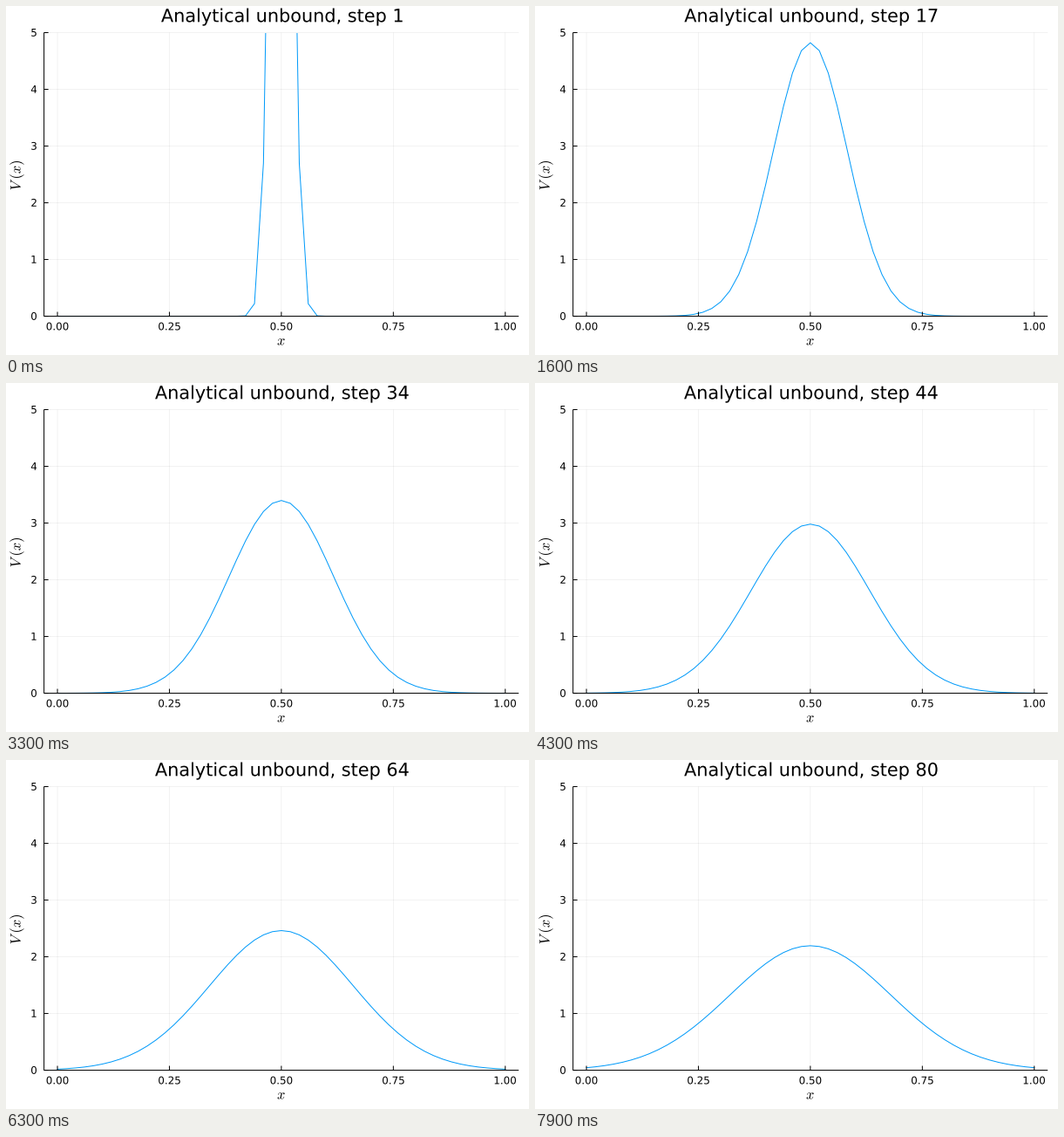
A matplotlib script for the animation above (8000 ms loop, 600 px wide and 400 px high).

```python
import numpy as np
import matplotlib.pyplot as plt
from matplotlib.animation import FuncAnimation
from matplotlib.patches import PathPatch
from matplotlib.textpath import TextPath
from matplotlib.transforms import Affine2D

W, H, DPI = 600, 400, 100
STEPS, INTERVAL = 80, 100
LEFT, RIGHT, TOP, BOTTOM = 43.6, 588.2, 30.5, 355.55
XMIN, XMAX, YMAX = -0.03, 1.03, 5
PX = 72 / DPI  # points per pixel
DT = 2e-4

plt.rcParams["font.family"] = "DejaVu Sans"
plt.rcParams["mathtext.fontset"] = "cm"

fig = plt.figure(figsize=(W / DPI, H / DPI), dpi=DPI, facecolor="white")
ax = fig.add_axes([LEFT / W, 1 - BOTTOM / H, (RIGHT - LEFT) / W, (BOTTOM - TOP) / H])
ax.set(xlim=(XMIN, XMAX), ylim=(0, YMAX))
ax.axis("off")

x_scale = (RIGHT - LEFT) / (XMAX - XMIN)
y_scale = (BOTTOM - TOP) / YMAX
x_ticks = np.linspace(0, 1, 5)
y_ticks = np.arange(YMAX + 1)


def rules(draw_lines, at, start, end, width=1, **kw):
    """Parallel straight lines at exact subpixel positions."""
    draw_lines(at, start, end, colors="black", linewidths=width * PX,
               snap=False, clip_on=False, **kw)


def text_path(text, size):
    """Text outline in pixels, centred horizontally on its baseline."""
    path = TextPath((0, 0), text, size=size)
    box = path.get_extents()
    return Affine2D().translate(-(box.x0 + box.x1) / 2, 0).transform_path(path)


def label(x, y, text, size, angle=0):
    """Text with its baseline centre at a pixel position, y from the top."""
    place = Affine2D().rotate_deg(angle).translate(x, H - y).scale(1 / DPI)
    patch = PathPatch(text_path(text, size), facecolor="black", linewidth=0,
                      snap=False, transform=place + fig.dpi_scale_trans)
    return fig.add_artist(patch)


# grid, ticks, axis lines
rules(ax.vlines, x_ticks, 0, YMAX, width=0.5, alpha=0.1, zorder=1)
rules(ax.hlines, y_ticks, XMIN, XMAX, width=0.5, alpha=0.1, zorder=1)
rules(ax.vlines, x_ticks, 0, 5 / y_scale, zorder=3)
rules(ax.hlines, y_ticks, XMIN, XMIN + 5 / x_scale, zorder=3)
rules(ax.vlines, XMIN, 0, YMAX, zorder=3)
rules(ax.hlines, 0, XMIN, XMAX, zorder=3)

for v in x_ticks:
    label(LEFT + (v - XMIN) * x_scale, 371.4, f"{v:.2f}", 11.9)
for v in y_ticks:
    label(32, BOTTOM - v * y_scale + 4.2, str(v), 11.9)
label(315.6, 388.5, "$x$", 16.4)
label(16.5, 194.2, r"$V\:(x)$", 16.4, angle=90)
title = label(316.4, 18.3, "step", 20.8)

x = np.linspace(0, 1, 51)
curve, = ax.plot([], [], color="#009AFA", linewidth=PX, snap=False, zorder=2)


def draw(i):
    # point pulse on a leaky cable: spreads as a Gaussian and decays
    t = DT * (i + 1)
    v = np.exp(-(x - 0.5) ** 2 / (4 * t) - t) / np.sqrt(4 * np.pi * t)
    curve.set_data(x, v)
    title.set_path(text_path(f"Analytical unbound, step {i + 1}", 20.8))
    return curve, title


anim = FuncAnimation(fig, draw, frames=STEPS, interval=INTERVAL, repeat=True)
plt.show()
```
